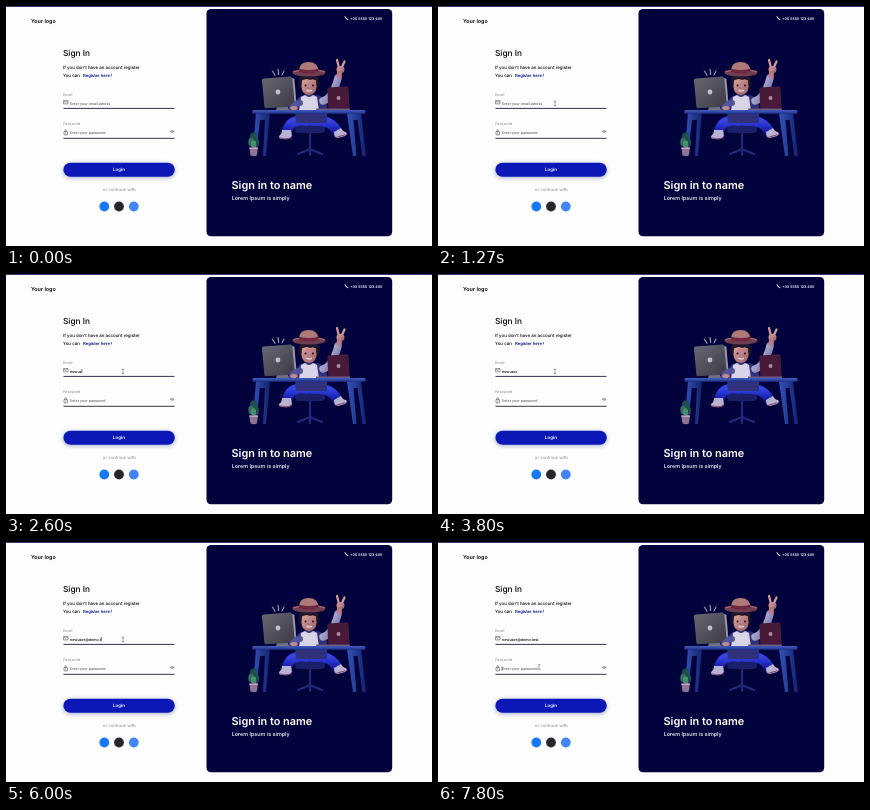
An HTML page for the animation above (8000 ms loop, 426 px wide and 240 px high).

```html
<!DOCTYPE html>
<html lang="en">
<head>
<meta charset="utf-8">
<title>Sign in</title>
<style>
  html, body { margin: 0; width: 100%; height: 100%; overflow: hidden; background: #fdfdfd; }
  svg { display: block; width: 100%; height: 100%; }
  text { font-family: Inter, "Open Sans", sans-serif; font-weight: 500; text-rendering: geometricPrecision; white-space: pre; }
  .line { fill: none; stroke-linecap: round; stroke-linejoin: round; }
  .icon { fill: none; stroke: #555; stroke-width: .6; }
  .hint { fill: #626262; font-size: 3.6px; }
  .label { fill: #999; font-size: 3.7px; }
  .bold { font-weight: 600; }
</style>
</head>
<body>
<svg viewBox="0 0 426 240">
  <defs>
    <linearGradient id="desk" x2="0" y2="1"><stop stop-color="#4460c0"/><stop offset="1" stop-color="#1d2f86"/></linearGradient>
    <linearGradient id="leg" x2="1"><stop stop-color="#3354b8"/><stop offset="1" stop-color="#14226f"/></linearGradient>
    <linearGradient id="screen" x2="1" y2="1"><stop stop-color="#6a6a76"/><stop offset="1" stop-color="#393945"/></linearGradient>
    <linearGradient id="shirt" x2="1" y2="1"><stop stop-color="#d9d6ec"/><stop offset="1" stop-color="#5f5f9c"/></linearGradient>
    <linearGradient id="jeans" x2="0" y2="1"><stop stop-color="#3346e6"/><stop offset="1" stop-color="#1518a4"/></linearGradient>
    <linearGradient id="skin" x2="1" y2="1"><stop stop-color="#dfa39a"/><stop offset="1" stop-color="#96606f"/></linearGradient>
    <filter id="soft" x="-10%" y="-70%" width="120%" height="240%"><feGaussianBlur stdDeviation="2"/></filter>
  </defs>

  <rect width="426" height="240" fill="#fdfdfd"/>
  <rect width="426" height="1" fill="#41356f"/>

  <!-- form -->
  <text class="bold" x="25" y="17" font-size="5.4">Your logo</text>
  <text x="57" y="50.2" font-size="8.3">Sign In</text>
  <g font-size="4.4">
    <text x="57" y="63.4">If you don't have an account register</text>
    <text x="57" y="71.4">You can</text>
    <text class="bold" x="77" y="71.4" font-size="4.2" fill="#000c91">Register here !</text>
  </g>
  <text class="label" x="57" y="90.2">Email</text>
  <text class="label" x="57" y="119.2">Password</text>
  <path class="icon" d="M57.6 94.6h4.4v3.3h-4.4zl2.2 1.9 2.2-1.9"/>
  <path class="icon" d="M58 125.6h3.4v3.3H58zM58.7 125.6v-.8a1 1 0 0 1 2 0v.8M59.7 126.7v1"/>
  <path class="icon" d="M164.2 125.4q2-2.4 4 0q-2 2.2-4 0M165.6 125.4h1.2"/>
  <path d="M57.5 102.4h111M57.5 132.3h111" stroke="#1c1c38" stroke-width=".9"/>
  <text id="hint" class="hint" x="64" y="98.5">Enter your email adress</text>
  <text id="email" x="64" y="98.5" font-size="3.7"></text>
  <text class="hint" x="64" y="127.9">Enter your password</text>
  <path id="caret" d="M0 0v4.4" stroke="#000" stroke-width=".5"/>

  <rect x="57" y="157.5" width="112" height="14.5" rx="7.2" fill="#20308a" opacity=".38" filter="url(#soft)"/>
  <rect x="57.4" y="156.7" width="111.4" height="14" rx="7" fill="#0b18b5"/>
  <text class="bold" x="113" y="165.3" font-size="4.5" fill="#fff" text-anchor="middle">Login</text>
  <text x="113.4" y="185.4" font-size="4.3" fill="#999" text-anchor="middle">or continue with</text>
  <circle cx="98.3" cy="200.5" r="4.9" fill="#1778f2"/>
  <circle cx="113" cy="200.5" r="4.9" fill="#25272d"/>
  <circle cx="127.8" cy="200.5" r="4.9" fill="#4285f4"/>

  <!-- panel -->
  <rect x="200.5" y="3" width="185.7" height="227.3" rx="4.5" fill="#02023d"/>
  <path class="line" d="M339 10.7q.4 2.6 3 3" stroke="#fff" stroke-width="1"/>
  <text class="bold" x="344" y="13.7" font-size="3.65" fill="#fff">+00 5550 123 400</text>
  <text class="bold" x="225.5" y="182.9" font-size="10.9" fill="#fff">Sign in to name</text>
  <text x="225.7" y="193.6" font-size="5.45" fill="#fff">Lorem Ipsum is simply</text>

  <!-- chair -->
  <path class="line" d="M304 126v17M304 143l-12 5M304 143l12 5M304 142v7" stroke="#20297a" stroke-width="2.2"/>
  <rect x="289" y="119" width="30" height="8" rx="4" fill="#1a2069"/>
  <!-- legs and shoes -->
  <path class="line" d="M301 115Q284 112 281 126M307 115q17-2 24 10" stroke="url(#jeans)" stroke-width="10"/>
  <path d="M276 124h9l1 6q-2 3-8 3q-6 0-5-3q3-2 3-6z" fill="#b9b2d0"/>
  <path d="M328 126l7-4q2 4 5 4q2 2-1 4l-7 2q-4 0-4-6z" fill="#b9b2d0"/>
  <path class="line" d="M273.5 131.8q6 2 12 0M330 131.5l9-2.7" stroke="#8c4a72" stroke-width="1.2"/>

  <!-- desk legs -->
  <path d="M250 107h14l-4 43h-3l2-36h-5l-4 36h-3.5z" fill="url(#leg)"/>
  <path d="M341 107h14l5 43h-3.5l-5-36h-4l3 36h-3.5z" fill="url(#leg)"/>
  <!-- torso and raised arm -->
  <path d="M289 106q-1-15 9-17h13q11 2 10 16v12h-31z" fill="#30307c"/>
  <path d="M295 91l4-2q4 4 8 0l4 2 2 14h-20z" fill="#d6d4e6"/>
  <path class="line" d="M317 95q10-3 15-23" stroke="url(#shirt)" stroke-width="7.5"/>
  <path class="line" d="M333 70l1-6" stroke="#b77c86" stroke-width="5"/>
  <path class="line" d="M333 62l-2-8M335.5 62l3-6.5" stroke="#cf989a" stroke-width="2.3"/>
  <ellipse cx="334.5" cy="63.5" rx="4" ry="3.5" fill="url(#skin)"/>
  <!-- head -->
  <ellipse cx="303" cy="77" rx="10.8" ry="9.5" fill="#181326"/>
  <path d="M296 74q7-3 14 0l.5 7q-1 8-7.5 8t-7.5-8z" fill="url(#skin)"/>
  <path d="M294 76q5-5 10-2 4-2 8 2v-8h-18z" fill="#211629"/>
  <circle cx="299.5" cy="79.5" r="1" fill="#1d1020"/>
  <circle cx="307" cy="79.5" r="1" fill="#1d1020"/>
  <path class="line" d="M300.8 84.3q2.4 1.5 4.8 0" stroke="#f0dfe2" stroke-width="1.1"/>
  <!-- hat -->
  <ellipse cx="303" cy="66.7" rx="16.5" ry="3.9" fill="#6f3d50"/>
  <path d="M287.5 65.6q15.5-4 31 0" class="line" stroke="#a7686d" stroke-width="1.1"/>
  <path d="M293 65q0-9 9.5-9t10 9q-10 3.5-19.5 0" fill="#ad7a78"/>
  <path d="M293 62.7q10 2.6 19.4 0l.2 3q-10 3-19.6 0z" fill="#70243d"/>

  <!-- desk and things on it -->
  <path class="line" d="M266.5 65l2.5 4.5M272 63.5l.7 5M278 65l-2 4" stroke="#cfcfe0" stroke-width=".9"/>
  <rect x="246.5" y="104" width="113" height="3.8" rx="1.2" fill="url(#desk)"/>
  <path d="M272 98h9l2 6h-13z" fill="#737285"/>
  <path d="M285 71.5l3.4 1.3 2.2 26-2.2 1.8z" fill="#9897a6"/>
  <path d="M256 74q0-1.4 1.5-1.6l27-2q1.5 0 1.7 1.4l2.6 27q0 1.6-1.6 1.8l-27 1.6q-1.6 0-1.8-1.5z" fill="url(#screen)"/>
  <circle cx="272" cy="86" r="2.4" fill="#c0bfcb"/>
  <path class="line" d="M294 97q-5 0-8 5" stroke="#53539a" stroke-width="6"/>
  <ellipse cx="288" cy="102" rx="3.6" ry="2.1" fill="#c08b90"/>
  <path d="M323 81.5l18-1.2q1.5 0 1.5 1.5l1 20.5q0 1.5-1.5 1.5h-18q-1.5 0-1.7-1.4l-1-19.2q0-1.5 1.7-1.7" fill="#471a3a"/>
  <circle cx="332.5" cy="92" r="1.9" fill="#a890a6"/>
  <path d="M310 102.6h34v1.4h-34z" fill="#6c5a80"/>

  <!-- plant -->
  <g fill="#1d4f4c">
    <ellipse cx="247.5" cy="131" rx="3.5" ry="4.5"/>
    <ellipse cx="245" cy="136" rx="2.7" ry="4.3" fill="#2e6f5d"/>
    <ellipse cx="250.3" cy="136.5" rx="2.7" ry="4.3"/>
    <ellipse cx="247.5" cy="138" rx="2.6" ry="3.8" fill="#4a8f6d"/>
  </g>
  <path d="M243.4 141.5h8.6l-1.1 8q-3.2 1.3-6.4 0z" fill="#8f7296"/>
  <path d="M243.4 141.5h8.6l-.2 1.5h-8.2z" fill="#c3a5b8"/>

  <g id="mouse">
    <path id="beam" class="line" d="M-1-2.4Q0-2.4 0-1.8Q0-2.4 1-2.4M0-1.8V1.8M-1 2.4Q0 2.4 0 1.8Q0 2.4 1 2.4" stroke="#444" stroke-width=".5"/>
    <path id="arrow" d="M0 0v5.2l1.3-1.2.9 2 .9-.4-.9-2h1.7z" fill="#111" stroke="#fff" stroke-width=".3"/>
  </g>
</svg>
<script>
  const $ = id => document.getElementById(id);
  const LOOP = 8000, BLINK = 530, FOCUS = 1330, SWITCH = 7600;
  const ADDRESS = "newuser@demo.test";
  const KEYS = [1470, 1730, 2000, 2270, 2600, 2800, 3000, 4670,
                5270, 5400, 5530, 5670, 5800, 6000, 6270, 6470, 6730];

  const ease = (t, from, to) => {
    const p = Math.min(1, Math.max(0, (t - from) / (to - from)));
    return p * p * (3 - 2 * p);
  };
  const show = (id, on) => $(id).setAttribute("visibility", on ? "visible" : "hidden");
  const move = (id, x, y) => $(id).setAttribute("transform", `translate(${x} ${y})`);

  function drawMouse(t) {
    const enter = ease(t, 200, 800), leave = ease(t, 7070, 7600);
    const x = 185 - 68 * enter - 16 * leave;
    const y = 135 - 37.5 * enter + 27.5 * leave;
    const overField = x < 169 && (y > 92 && y < 103 || y > 121 && y < 133);
    move("mouse", x, y);
    show("beam", t >= 200 && overField);
    show("arrow", t >= 200 && !overField);
  }

  function drawField(t) {
    const count = KEYS.filter(k => k <= t).length;
    const inPassword = t >= SWITCH;
    const since = inPassword ? SWITCH : count ? KEYS[count - 1] : FOCUS;
    $("email").textContent = ADDRESS.slice(0, count);
    show("hint", !count);
    const end = count ? $("email").getComputedTextLength() : 0;
    move("caret", inPassword ? 64 : 64.3 + end, inPassword ? 124.3 : 95);
    show("caret", t >= FOCUS && Math.floor((t - since) / BLINK) % 2 === 0);
  }

  function frame() {
    const t = performance.now() % LOOP;
    drawMouse(t);
    drawField(t);
    requestAnimationFrame(frame);
  }
  frame();
</script>
</body>
</html>
```
